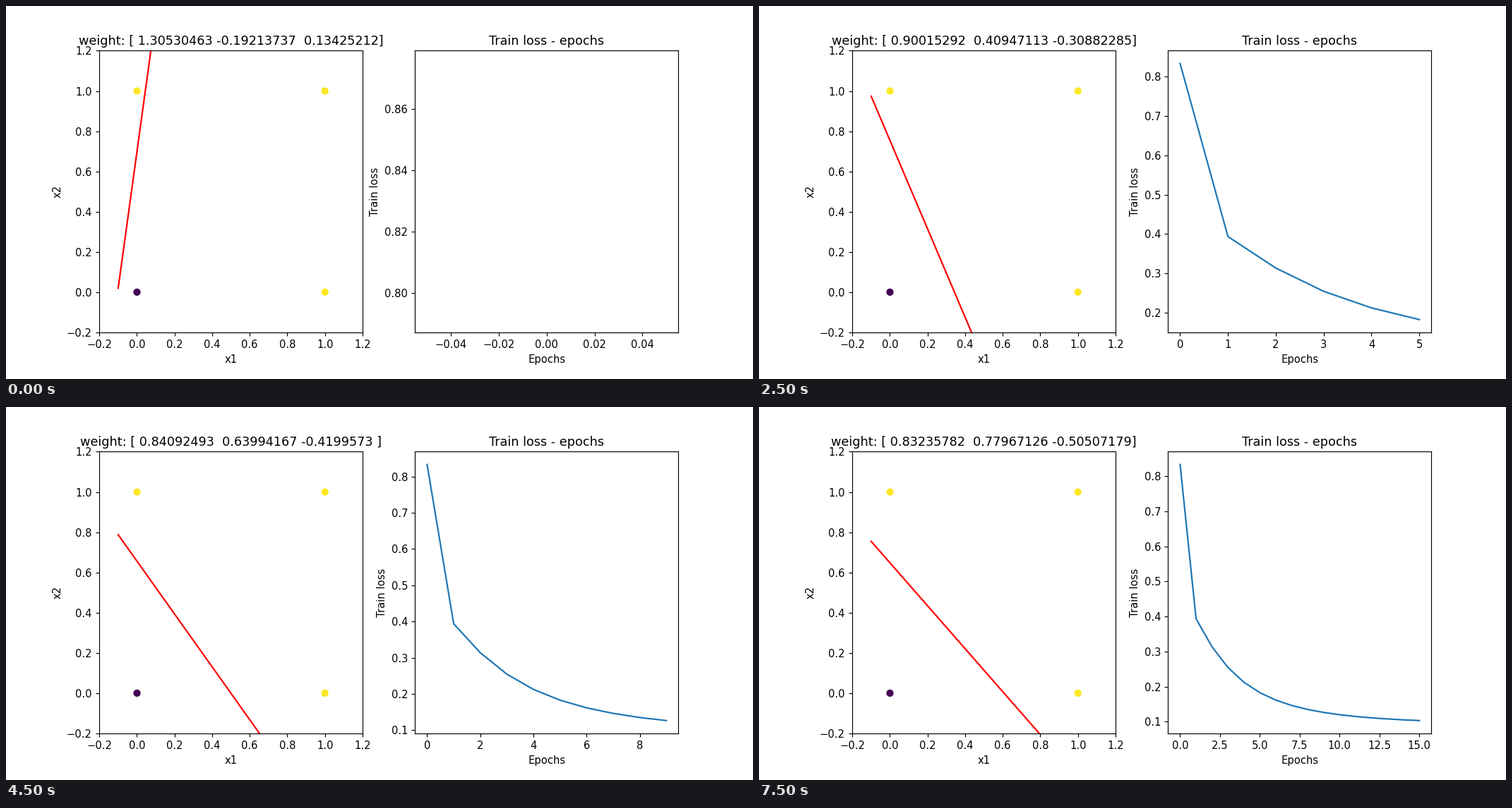
Write a matplotlib script that moves like this. It is 1058 px wide and 529 px high and loops after 8 s.

```python
import numpy as np
import matplotlib.pyplot as plt
from matplotlib.animation import FuncAnimation

EPOCHS = 16
RATE = 0.2
X = np.array([[0, 0, 1], [0, 1, 1], [1, 0, 1], [1, 1, 1]], float)
T = np.array([-1, 1, 1, 1], float)
BATCHES = ([1, 2], [0, 3])


def train_epoch(w):
    """One pass of mini-batch least squares; returns weights and mean loss."""
    total = 0
    for batch in BATCHES:
        x, t = X[batch], T[batch]
        w = w + RATE * x.T @ (t - x @ w)
        total += np.mean((t - x @ w) ** 2) / 2
    return w, total


weights = [np.array([1.3053046275, -0.1921373715, 0.1342521245])]
losses = [0.83311]
for _ in range(EPOCHS - 1):
    w, loss = train_epoch(weights[-1])
    weights.append(w)
    losses.append(loss)

plt.rcParams["font.family"] = "DejaVu Sans"
fig, (left, right) = plt.subplots(1, 2, figsize=(10, 5), dpi=105.8)
fig.subplots_adjust(left=0.125, right=0.9, bottom=0.125, top=0.88, wspace=0.2)

left.scatter(X[:, 0], X[:, 1], c=T)
boundary, = left.plot([], [], "r")
left.set(xlim=(-0.2, 1.2), ylim=(-0.2, 1.2), xlabel="x1", ylabel="x2")
title = left.set_title("")

curve, = right.plot([], [])
right.set(title="Train loss - epochs", xlabel="Epochs", ylabel="Train loss")

xs = np.array([-0.1, 1.1])


def update(epoch):
    w = weights[epoch]
    boundary.set_data(xs, -(w[0] * xs + w[2]) / w[1])
    title.set_text(f"weight: {w}")
    curve.set_data(range(epoch + 1), losses[:epoch + 1])
    right.relim()
    right.autoscale_view()
    return boundary, title, curve


anim = FuncAnimation(fig, update, frames=EPOCHS, interval=500,
                     init_func=lambda: update(0), repeat=True, repeat_delay=0)
plt.show()
```
